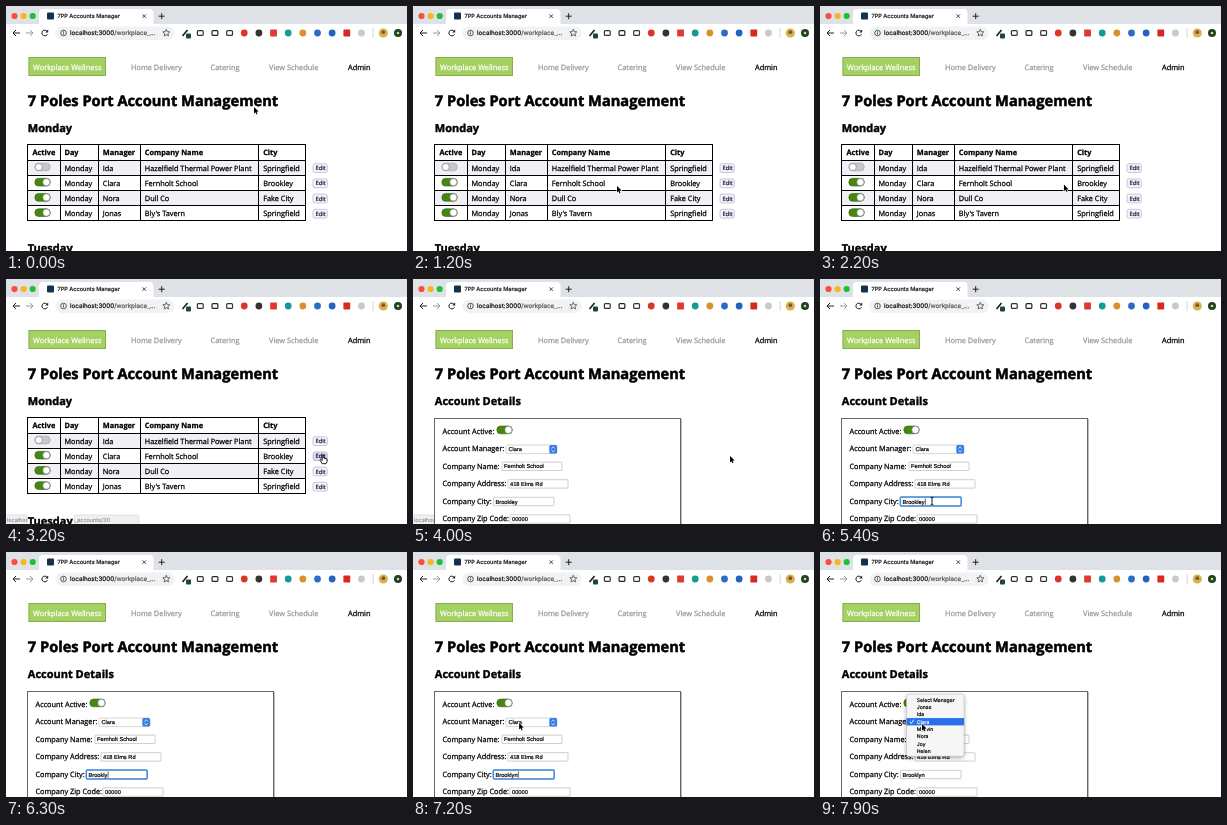
These frames come from a looping animation (401x245 px, 8 s). An HTML page with a canvas:

```html
<!DOCTYPE html>
<html lang="en">
<head>
<meta charset="utf-8">
<title>Accounts Manager</title>
<style>
html, body { margin: 0; width: 100%; height: 100%; overflow: hidden; background: #fff; }
canvas { display: block; width: 401px; height: 245px; }
</style>
</head>
<body>
<canvas id="stage"></canvas>
<script>
const W = 401, H = 245, LOOP = 8000;
const canvas = document.getElementById('stage');
const ctx = canvas.getContext('2d');
const ratio = Math.max(1, window.devicePixelRatio || 1);
canvas.width = W * ratio;
canvas.height = H * ratio;

const SANS = '"Open Sans", "Noto Sans", sans-serif';
const ARIAL = '"Liberation Sans", Arial, sans-serif';
const UI = 'Inter, Roboto, sans-serif';

const T = { hover: 2850, page: 3700, bubbleEnd: 4300, ibeam: 5150, focus: 5300, typing: 5700, moveAgain: 6650, menu: 7400 };

// time, x, y
const PATH = [
  [0, 248, 101], [250, 248, 101], [1150, 204, 180], [1800, 204, 180],
  [2800, 317, 176], [4200, 317, 177], [5250, 112, 222], [6650, 112, 222],
  [7250, 106, 170], [7600, 106, 170], [7850, 102, 172], [8000, 102, 172]
];
const EDITS = [[0, 'Brookley'], [5800, 'Brookle'], [5950, 'Brookl'], [6200, 'Brookly'], [6450, 'Brooklyn']];
const ROWS = [
  [false, 'Ida', 'Hazelfield Thermal Power Plant', 'Springfield'],
  [true, 'Clara', 'Fernholt School', 'Brookley'],
  [true, 'Nora', 'Dull Co', 'Fake City'],
  [true, 'Jonas', "Bly's Tavern", 'Springfield']
];
const MENU = ['Select Manager', 'Jonas', 'Ida', 'Clara', 'Marvin', 'Nora', 'Joy', 'Helen'];

// A hairline outline gives the small type its weight.
function text(s, x, y, size, color = '#000', weight = 400, family = SANS) {
  ctx.font = `${weight} ${size}px ${family}`;
  ctx.fillStyle = ctx.strokeStyle = color;
  ctx.lineWidth = size * 0.035;
  ctx.fillText(s, x, y);
  ctx.strokeText(s, x, y);
}

function rect(x, y, w, h, color) {
  ctx.fillStyle = color;
  ctx.fillRect(x, y, w, h);
}

function round(x, y, w, h, r, fill, stroke, line = 0.6) {
  ctx.beginPath();
  ctx.roundRect(x, y, w, h, r);
  if (fill) { ctx.fillStyle = fill; ctx.fill(); }
  if (stroke) { ctx.strokeStyle = stroke; ctx.lineWidth = line; ctx.stroke(); }
}

function dot(x, y, r, fill, stroke, line = 0.7) {
  ctx.beginPath();
  ctx.arc(x, y, r, 0, Math.PI * 2);
  if (fill) { ctx.fillStyle = fill; ctx.fill(); }
  if (stroke) { ctx.strokeStyle = stroke; ctx.lineWidth = line; ctx.stroke(); }
}

function poly(points, stroke, line, fill, close) {
  ctx.beginPath();
  points.forEach(([x, y]) => ctx.lineTo(x, y));
  if (close) ctx.closePath();
  if (fill) { ctx.fillStyle = fill; ctx.fill(); }
  if (stroke) { ctx.strokeStyle = stroke; ctx.lineWidth = line; ctx.stroke(); }
}

function star(cx, cy, r) {
  const pts = Array.from({ length: 10 }, (_, i) => {
    const a = -Math.PI / 2 + i * Math.PI / 5, q = i % 2 ? r * 0.45 : r;
    return [cx + q * Math.cos(a), cy + q * Math.sin(a)];
  });
  poly(pts, '#444', 0.8, null, true);
}

function toggle(x, y, on) {
  round(x, y, 15.5, 7.8, 3.9, on ? '#468712' : '#c8c8c8', on ? '#33690c' : '#a5a5a5', 0.6);
  dot(x + (on ? 11.6 : 3.9), y + 3.9, 3.6, '#fff', '#777', 0.6);
}

function drawBrowser() {
  rect(0, 0, W, 18, '#dee1e6');
  round(33, 3, 114.5, 18, 4, '#fff');
  rect(0, 18, W, 19, '#fff');
  ['#fb4b45', '#f8b51e', '#1fbf38'].forEach((c, i) => dot(8.5 + i * 9.1, 10, 3.1, c));
  round(41, 6.5, 7, 7, 1, '#14324f');
  text('7PP Accounts Manager', 51.5, 12.2, 5.6, '#222', 500, UI);
  poly([[136.5, 8.4], [140, 11.9]], '#333', 0.9);
  poly([[140, 8.4], [136.5, 11.9]], '#333', 0.9);
  poly([[152.7, 10.2], [158.7, 10.2]], '#222', 1);
  poly([[155.7, 7.2], [155.7, 13.2]], '#222', 1);

  poly([[14, 27], [7, 27]], '#222', 1);
  poly([[10, 24], [7, 27], [10, 30]], '#222', 1);
  poly([[20, 27], [27, 27]], '#999', 1);
  poly([[24, 24], [27, 27], [24, 30]], '#999', 1);
  ctx.beginPath();
  ctx.arc(38.8, 27, 2.9, 0.4, 5.5);
  ctx.strokeStyle = '#222';
  ctx.lineWidth = 1;
  ctx.stroke();
  poly([[42.2, 23.5], [42.2, 26.5], [39.2, 26.5]], null, 0, '#222', true);

  round(49.5, 20.5, 119, 13.5, 6.7, '#f0f2f4');
  dot(57.5, 27, 2.8, null, '#333', 0.8);
  rect(57.1, 26.3, 0.8, 2.2, '#333');
  rect(57.1, 25, 0.8, 0.8, '#333');
  const host = 'localhost:3000';
  text(host, 64, 29.2, 6.25, '#111', 400, UI);
  const hostWidth = ctx.measureText(host).width;
  text('/workplace_…', 64 + hostWidth, 29.2, 6.25, '#555', 400, UI);
  star(160.3, 27, 3.7);

  poly([[176.5, 30], [181.5, 24]], '#222', 1.7);
  round(180, 27.5, 5, 5, 1, '#1f4a2a');
  const icons = ['#333', '#222', '#333', '#dd3428', '#333', '#e03a30', '#159a94', '#d9922b', '#2c6dc4', '#2363c0', '#d9281f', '#c9c9c9'];
  icons.forEach((c, i) => {
    const x = 194.3 + i * 14.65;
    if (i < 3) round(x - 2.9, 24.6, 5.8, 4.8, 1, null, c, 1.2);
    else if (i % 5 === 0) round(x - 3.4, 23.6, 6.8, 6.8, 0.6, c);
    else dot(x, 27, 3.4, c);
  });
  rect(366.7, 22, 0.8, 10, '#ccc');
  dot(377.3, 27, 4.6, '#d5b54a');
  dot(377.3, 26.2, 1.9, '#8a4f35');
  dot(392, 27, 4, '#1d4420');
  dot(392, 27, 1.3, '#e8c9a0');
}

function drawHeader() {
  rect(23, 51, 77, 19, '#a5d162');
  ctx.strokeStyle = '#84ad4c';
  ctx.lineWidth = 1;
  ctx.strokeRect(22.9, 51.5, 76.6, 18);
  const links = [['Workplace Wellness', 27, '#fff'], ['Home Delivery', 125, '#999'], ['Catering', 204.5, '#999'], ['View Schedule', 263, '#999'], ['Admin', 342, '#000']];
  links.forEach(([s, x, c]) => text(s, x, 63.5, 7.4, c));
  text('7 Poles Port Account Management', 21.8, 100.3, 14.65, '#000', 700);
}

function drawTable(t) {
  text('Monday', 21.8, 126, 11, '#000', 700);
  const cols = [21.5, 54.5, 92.5, 134.5, 252.5, 299.5];
  const lines = [138.5, 154.5, 169.5, 184.5, 199.5, 214.5];
  [1, 3].forEach(i => rect(22, lines[i], 278, 15, '#f2f0f6'));
  ctx.strokeStyle = '#000';
  ctx.lineWidth = 1;
  ctx.beginPath();
  cols.forEach(x => { ctx.moveTo(x, 138); ctx.lineTo(x, 215); });
  lines.forEach(y => { ctx.moveTo(21, y); ctx.lineTo(300, y); });
  ctx.stroke();
  const left = [26.5, 58.5, 96.8, 138.8, 257.2];
  ['Active', 'Day', 'Manager', 'Company Name', 'City'].forEach((s, i) => text(s, left[i], 149.2, 7.33, '#000', 700));
  ROWS.forEach(([on, ...names], i) => {
    const y = 162 + i * 15.2;
    toggle(28.8, y - 4.9, on);
    ['Monday', ...names].forEach((s, k) => text(s, left[k + 1], y + 2.7, 7.33));
    const hot = i === 1 && t >= T.hover;
    round(307, y - 4.3, 14.3, 8.8, 2, hot ? '#ddd6ee' : '#f5f3fb', '#aaa3c2');
    text('Edit', 309.5, y + 2.2, 5.7, '#1d1736');
  });
  rect(21.5, 234, 46.5, 11, '#fff');
  text('Tuesday', 21.8, 246, 11, '#000', 700);
}

function field(x, y, value, w = 60, focused = false) {
  round(x, y, w, 8.4, 0.3, '#fff', '#bbb', 0.7);
  if (focused) round(x - 0.2, y - 0.2, w + 0.4, 8.8, 0.8, null, '#3d8ce0', 1.5);
  text(value, x + 2, y + 6.3, 5.7, '#000', 400, ARIAL);
}

function drawForm(t) {
  text('Account Details', 21.8, 126, 11, '#000', 700);
  rect(268, 140, 1, 105, '#bdbdbd');
  rect(22, 139, 245, 106, '#fff');
  ctx.strokeStyle = '#666';
  ctx.lineWidth = 1;
  ctx.strokeRect(21.5, 139.5, 246, 120);

  ['Account Active:', 'Account Manager:', 'Company Name:', 'Company Address:', 'Company City:', 'Company Zip Code:'].forEach((s, i) => {
    text(s, 29.5, 154.5 + i * 17.55, 7.33);
  });
  toggle(83.8, 147, true);

  round(93, 166, 51, 8.6, 1.5, '#fff', '#bbb');
  text('Clara', 95.5, 172.3, 5.6, '#000', 400, ARIAL);
  round(136.3, 166, 7.7, 8.6, 1.5, '#327de6');
  poly([[138.5, 169.6], [140.1, 167.7], [141.7, 169.6]], '#fff', 0.7);
  poly([[138.5, 171.2], [140.1, 173.1], [141.7, 171.2]], '#fff', 0.7);

  const focused = t >= T.focus && t < T.menu;
  const city = EDITS.filter(e => e[0] <= t).pop()[1];
  field(89, 183.1, 'Fernholt School');
  field(95, 200.7, '418 Elms Rd');
  field(80.5, 218.3, city, 60.5, focused);
  field(97, 235.8, '00000');
  if (focused) {
    ctx.font = `400 5.7px ${ARIAL}`;
    rect(82.8 + ctx.measureText(city).width, 219.5, 0.6, 6.2, '#000');
  }
  if (t >= T.menu) drawMenu();
}

function drawMenu() {
  const x = 86.5, y = 142.2, w = 57.5, step = 7.35;
  ctx.save();
  ctx.shadowColor = 'rgba(0,0,0,.35)';
  ctx.shadowBlur = 4 * ratio;
  ctx.shadowOffsetY = 1.5 * ratio;
  round(x, y, w, 62, 2, '#f6f6f6');
  ctx.restore();
  round(x, y, w, 62, 2, null, '#bbb', 0.5);
  const top = y + 1.8;
  rect(x, top + 3 * step, w, step, '#2a70ec');
  MENU.forEach((s, i) => text(s, 96.8, top + i * step + 5.5, 5.1, i === 3 ? '#fff' : '#000', 400, UI));
  const cy = top + 3.5 * step;
  poly([[90, cy], [91.3, cy + 1.8], [93.8, cy - 2]], '#fff', 0.9);
}

// Drawn below the page, whose blocks are opaque.
function drawBubble(t) {
  if (t < T.hover || t > T.bubbleEnd) return;
  const fadeIn = Math.min(1, (t - T.hover) / 300);
  const fadeOut = Math.min(1, (T.bubbleEnd - t) / 300);
  ctx.save();
  ctx.globalAlpha = fadeIn * fadeOut;
  round(-3, 236, 136, 12, 2, '#f0f0f0', '#d0d0d0', 0.6);
  text('localhost:3000/workplace_accounts/30', 0.8, 242.6, 5.5, '#999', 400, UI);
  ctx.restore();
}

function pointer(t) {
  let i = 0;
  while (i < PATH.length - 2 && PATH[i + 1][0] <= t) i++;
  const [t0, x0, y0] = PATH[i], [t1, x1, y1] = PATH[i + 1];
  const p = (t - t0) / (t1 - t0), e = p * p * (3 - 2 * p);
  return [x0 + (x1 - x0) * e, y0 + (y1 - y0) * e];
}

const ARROW = [[0, 0], [0, 6.6], [1.5, 5.2], [2.5, 7.4], [3.5, 6.9], [2.6, 4.8], [4.6, 4.6]];
const HAND = [[-0.8, 0], [0.6, 0], [0.9, 3], [4, 3.8], [4.2, 6], [3, 8.5], [-0.8, 8.5], [-3, 5], [-2.2, 4.2], [-0.8, 5.2]];

function drawPointer(t) {
  if (t >= T.typing && t < T.moveAgain) return;
  const [x, y] = pointer(t);
  ctx.save();
  ctx.translate(x, y);
  ctx.lineJoin = 'round';
  if (t >= T.hover && t < T.page) {
    poly(HAND, '#000', 0.9, '#fff', true);
  } else if (t >= T.ibeam && t < T.moveAgain + 100) {
    poly([[0, -3.5], [0, 3.5]], '#000', 0.9);
    [-1, 1].forEach(s => poly([[-1.5, 3.8 * s], [0, 3.3 * s], [1.5, 3.8 * s]], '#000', 0.7));
  } else {
    poly(ARROW, '#fff', 1.1, null, true);
    poly(ARROW, null, 0, '#000', true);
  }
  ctx.restore();
}

function draw(t) {
  ctx.setTransform(ratio, 0, 0, ratio, 0, 0);
  ctx.textRendering = 'geometricPrecision';
  ctx.lineJoin = 'miter';
  ctx.miterLimit = 2;
  rect(0, 0, W, H, '#fff');
  drawBrowser();
  drawHeader();
  drawBubble(t);
  if (t < T.page) drawTable(t);
  else drawForm(t);
  drawPointer(t);
}

const start = performance.now();
function tick(now) {
  draw(Math.max(0, now - start) % LOOP);
  requestAnimationFrame(tick);
}
draw(0);
requestAnimationFrame(tick);
</script>
</body>
</html>
```
